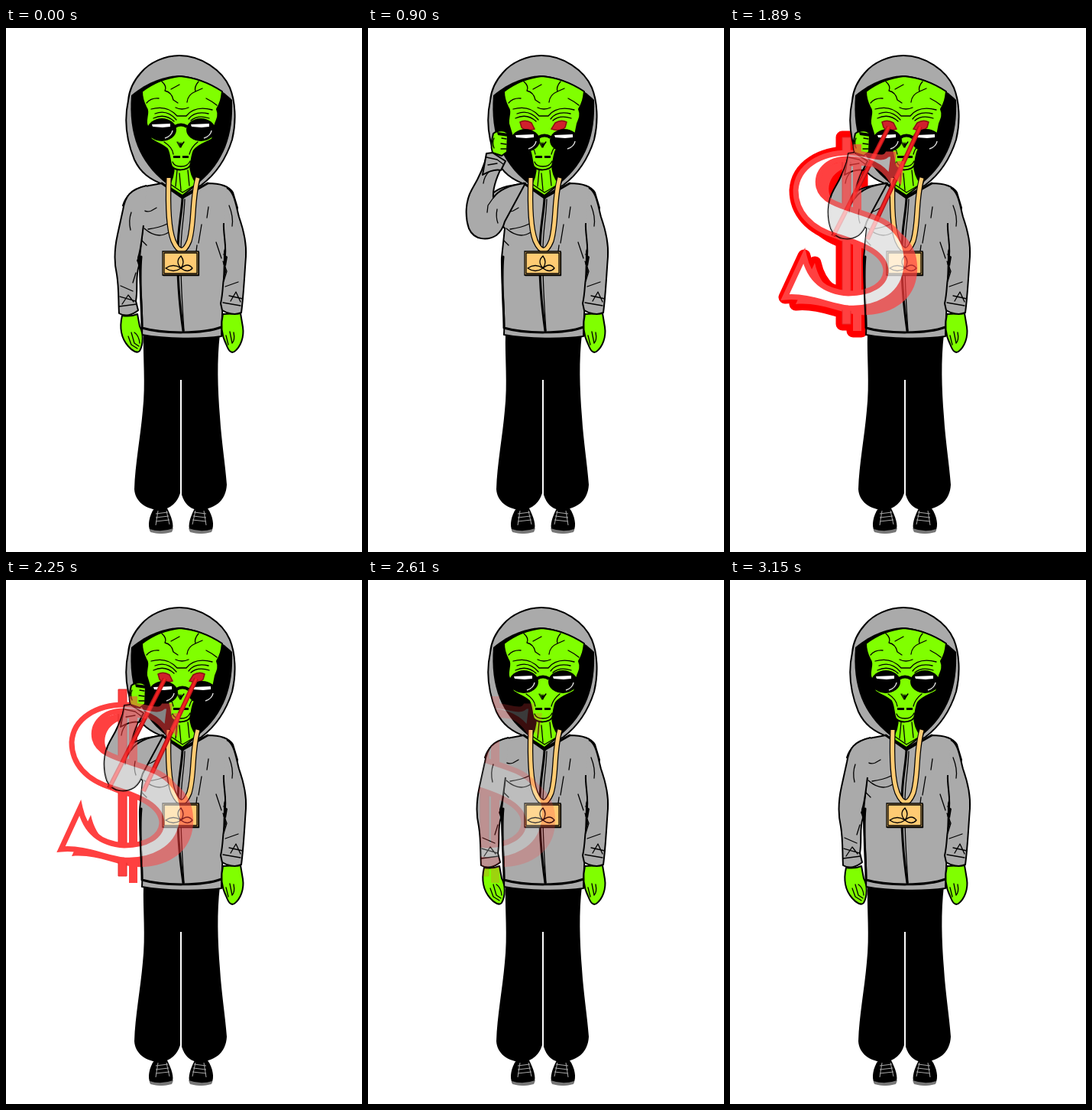
An HTML page that plays this animation: 466 by 685 pixels, repeating every 3.78 s.

```html
<!DOCTYPE html>
<html lang="en">
<head>
<meta charset="utf-8">
<title>Laser eyes</title>
<style>
html, body { margin: 0; width: 100%; height: 100%; overflow: hidden; background: #fff; }
svg { display: block; width: 100vw; height: 100vh; }
.gray { fill: #aaa; stroke: #000; stroke-width: 2; stroke-linejoin: round; }
.skin { fill: #80ff00; stroke: #000; stroke-width: 2; stroke-linejoin: round; }
.gold { fill: #ffcb73; stroke: #000; stroke-width: 1.3; }
.ink { fill: none; stroke: #000; stroke-width: 1.3; stroke-linecap: round; stroke-linejoin: round; }
.bold { stroke-width: 3; }
.red { fill: #ff4040; }
.halo { fill: #f00; stroke: #f00; stroke-width: 17; stroke-linejoin: round; }

/* One tick is 90 ms; 42 ticks make the loop. */
.anim, .glasses, .grip, .up, .down, .beam, .sign, .edge, .tint { animation: 3780ms step-end infinite; }
.glasses { animation-name: slide; }
.grip { animation-name: pull; }
.up { animation-name: up; }
.down { animation-name: down; }
.beam { animation-name: beam; }
.sign { animation-name: sign; }
.edge { animation-name: edge; }
.tint { animation-name: tint; }
@keyframes slide {
  0% { transform: none; }
  11.9% { transform: translate(0, 0); animation-timing-function: steps(5); }
  23.8% { transform: translate(2px, 14px); }
  69.04%, 100% { transform: none; }
}
@keyframes pull {
  0% { transform: none; }
  11.9% { transform: translate(0, 0); animation-timing-function: steps(5); }
  23.8%, 100% { transform: translate(-3px, 14px); }
}
@keyframes up { 0% { opacity: 0; } 11.9% { opacity: 1; } 69.04%, 100% { opacity: 0; } }
@keyframes down { 0% { opacity: 1; } 11.9% { opacity: 0; } 69.04%, 100% { opacity: 1; } }
@keyframes beam {
  0% { stroke-dashoffset: 1; }
  23.8% { stroke-dashoffset: 1; animation-timing-function: steps(4); }
  33.33% { stroke-dashoffset: 0; }
  69.04%, 100% { stroke-dashoffset: 1; }
}
@keyframes sign { 0% { opacity: 0; } 33.33% { opacity: 1; } 64.28%, 100% { opacity: 0; } }
@keyframes edge { 0% { opacity: 0; } 38.09% { opacity: 1; } 54.76%, 100% { opacity: 0; } }
@keyframes tint {
  0% { opacity: 0; }
  26.19% { opacity: 0; animation-timing-function: steps(6); }
  40.47% { opacity: .74; animation-timing-function: steps(4); }
  50% { opacity: .7; animation-timing-function: steps(4); }
  59.52% { opacity: .52; animation-timing-function: steps(4); }
  69.04% { opacity: .23; animation-timing-function: steps(6); }
  83.33%, 100% { opacity: 0; }
}
</style>
</head>
<body>
<svg viewBox="0 0 466 685" preserveAspectRatio="none">
  <defs>
    <path id="hood" d="M227 36C208 36 188 45 177 58C166 70 161 82 160 95C154 122 159 150 168 172C176 189 188 198 207 205L231 220L256 205C276 190 289 168 296 146C302 121 300 95 293 78C283 55 255 36 227 36Z"/>
    <path id="torso" d="M204 203L231 222L264 203C280 203 292 207 297 215L303 235L286 292C286 325 283 365 282 403C255 407 210 407 178 401C180 370 174 330 175 300L179 262L153 232C158 216 170 210 182 207Z"/>
    <path id="armRight" d="M289 209C299 214 301 232 305 247C311 264 315 284 314 299C312 325 311 350 308 372C300 376 289 373 283 369L281 360C285 343 283 329 287 319L286 304C290 288 284 270 285 255"/>
    <path id="armLeft" d="M184 206C162 211 156 220 153 238L146 270C142 288 141 305 145 322C148 340 147 358 148 373C156 378 166 375 173 369L170 357C173 340 169 325 174 311L173 300C177 288 178 272 180 258"/>
    <path id="armUp" d="M206 203C184 205 170 213 164 222C163 210 167 196 179 174L156 164C152 182 145 196 136 211C127 227 127 247 132 262C139 278 157 278 168 271C173 267 177 261 179 253Z"/>
    <path id="cuff" d="M158 150L166 149L183 160L177 172C169 170 160 174 153 178Z"/>
    <path id="fist" d="M167 124C173 119 182 119 186 124L185 148L178 153L166 149C163 140 165 133 167 124Z"/>
    <path id="handLeft" d="M152 376C148 393 152 407 160 416C165 422 172 426 175 422C180 413 180 399 175 390L172 374C165 377 158 377 152 376Z"/>
    <path id="ess" d="M214 165L210 197C200 181 181 171 155 171C126 171 112 189 116 208C122 232 160 235 195 250C225 264 235 290 230 318C224 352 190 368 155 366C130 364 105 349 72 352L97 298C104 330 125 345 155 347C185 347 203 335 204 318C204 295 175 283 140 272C105 262 86 240 86 212C88 180 120 163 155 163C180 163 200 175 206 165Z"/>
    <path id="bar" d="M147 143H158V387H147Z"/>
    <g id="dollar">
      <g class="red" transform="translate(14 9)"><use href="#ess"/><use href="#bar"/></g>
      <use href="#bar" fill="#ff4040" stroke="#e52b2b"/>
      <use href="#ess" fill="#fff" stroke="#ff4040" stroke-width="7"/>
    </g>
    <g id="lens">
      <ellipse rx="19" ry="15"/>
      <path d="M-13 -7L11 -8L11 -4L1 -3L-12 -4Z" fill="#fff"/>
      <path d="M4 11Q13 8 14 1" fill="none" stroke="#ddd" stroke-width="1.5"/>
    </g>
    <g id="shoe">
      <path d="M194 628C187 638 185 651 189 658Q203 663 217 658C221 650 216 638 211 628Z"/>
      <path d="M188 655Q203 660 219 654L217 659Q203 663 189 659Z" fill="#777"/>
      <path d="M196 635L212 633M196 640L213 638M196 645L214 643M199 631L196 650M210 631L214 649" stroke="#aaa" fill="none"/>
    </g>
    <clipPath id="raised">
      <use href="#hood"/><use href="#torso"/><use href="#armUp"/><use href="#cuff" transform="translate(-3 14)"/><use href="#fist" transform="translate(-3 14)"/>
    </clipPath>
    <clipPath id="lowered">
      <use href="#hood"/><use href="#torso"/><use href="#armLeft"/><use href="#handLeft"/>
    </clipPath>
  </defs>

  <g class="sign">
    <g class="edge halo">
      <use href="#ess"/><use href="#bar"/>
      <g transform="translate(14 9)"><use href="#ess"/><use href="#bar"/></g>
    </g>
    <use href="#dollar"/>
  </g>

  <!-- legs -->
  <path d="M180 400H280C276 435 277 470 280 508C282 540 287 570 289 597C288 618 273 630 250 630Q235 627 230 610L230 460L228 460L228 608Q222 627 203 630C183 630 169 619 168 603C169 570 176 535 179 500C183 465 179 430 180 400Z"/>
  <use href="#shoe"/>
  <use href="#shoe" transform="translate(458 0) scale(-1 1)"/>

  <!-- hood and head -->
  <use href="#hood" class="gray"/>
  <path d="M164 88C185 70 210 62 229 62C255 65 280 78 296 94C298 140 285 175 253 202L231 218L208 202C175 175 160 140 164 88Z"/>
  <path class="skin" d="M220 178C220 190 217 201 212 207L231 219L250 204C244 196 241 187 241 178Z"/>
  <path class="skin" d="M178 83C192 72 210 65 228 63C250 65 268 73 283 83C282 92 281 98 276 106C279 113 277 118 274 125L270 145C262 150 252 152 246 160C243 166 243 174 241 180C236 187 222 187 217 181C214 174 215 165 211 158C204 151 195 150 190 145L184 125C183 115 188 110 183 103C179 95 178 90 178 83Z"/>
  <path class="ink" d="M204 70Q211 76 208 82Q217 84 219 94L225 98M216 80L227 74M252 70Q246 77 248 83Q238 87 237 97M248 83L257 79M184 98Q190 91 200 92M262 92Q270 96 276 101M190 106Q211 100 224 115H236Q247 101 270 107M195 112Q211 106 223 120M239 119Q247 108 265 112M222 104Q230 108 239 104M193 118Q208 111 220 122M242 121Q251 113 266 118M224 186L222 207M238 186L240 206M227 190L229 212"/>
  <path class="ink" d="M224 149L228 156L233 149M229 150V155M218 175Q220 181 229 181T241 174M207 149Q218 156 219 165M251 149Q242 156 240 165"/>
  <path d="M225 148L229 157L233 148L229 152ZM219 167H228V170H219ZM231 167H239V170H231Z"/>
  <g fill="#d0202c" stroke="#811" stroke-width="1.5">
    <path d="M199 123Q206 119 214 124L218 132Q207 136 201 130Z"/>
    <path d="M260 123Q253 119 245 124L240 132Q252 136 258 130Z"/>
  </g>
  <g class="glasses">
    <path d="M184 129L180 124M221 129Q229 124 237 129M273 129L278 124" fill="none" stroke="#000" stroke-width="4"/>
    <use href="#lens" x="204" y="133"/>
    <use href="#lens" x="255" y="133"/>
  </g>

  <!-- jacket -->
  <use href="#torso" class="gray"/>
  <path class="ink bold" d="M204 203L231 222L264 203M177 299C174 330 178 365 178 392C205 400 258 400 282 391"/>
  <path class="ink" d="M212 202L231 215L253 202M176 235Q182 242 190 239L197 235M181 262Q198 277 213 267M186 263Q201 261 211 256M178 278L184 284M265 234L263 248M256 257L252 281M250 284L249 292M275 280L282 301"/>
  <path class="ink bold" d="M231 222C230 245 225 260 225 290C224 325 227 361 232 396"/>
  <path class="ink" d="M234 224C233 250 229 265 229 290C228 325 231 365 233 396"/>
  <path class="skin" d="M284 374C280 391 283 403 288 413C291 421 294 426 299 423C307 417 312 404 310 391L307 373Z"/>
  <path class="ink" d="M288 402L291 414M293 397L296 412Q300 408 298 398"/>
  <use href="#armRight" class="gray"/>
  <path class="ink" d="M292 232Q298 247 296 259M284 305L289 318L285 331M287 338L304 332M292 350L310 354M284 359L307 363M294 357L301 345L307 358"/>
  <path d="M284 295Q288 303 284 309L288 311L290 299Z"/>

  <!-- pendant -->
  <path d="M213 197C212 224 212 260 219 278Q230 303 240 278C247 254 243 224 251 197" fill="none" stroke="#000" stroke-width="7.5"/>
  <path d="M213 196C212 224 212 260 219 278Q230 303 240 278C247 254 243 224 251 196" fill="none" stroke="#ffcb73" stroke-width="5"/>
  <path class="gold" d="M205 292H252V323H205Z"/>
  <path class="ink" d="M207 294H250V321H207ZM229 314Q221 305 229 298Q235 306 229 314Q219 307 209 314Q219 321 229 314Q238 306 244 314Q238 321 229 314"/>
  <path class="ink" d="M206 323.500H252.500V293" stroke-width="2"/>

  <g class="down">
    <use href="#handLeft" class="skin"/>
    <path class="ink" d="M160 403L164 414L172 419M164 398L168 412L174 416M168 398Q174 402 175 412"/>
    <use href="#armLeft" class="gray"/>
    <path class="ink" d="M164 241Q160 252 163 264M170 320L166 333M150 337L166 344M149 351L170 357M148 364L171 361M152 361L160 349L167 358"/>
    <path d="M174 297L178 305L174 311L171 304Z"/>
  </g>
  <g class="up">
    <use href="#armUp" class="gray"/>
    <path class="ink" d="M164 222L157 232L156 241M159 187Q152 194 151 203M169 237Q167 247 170 255M172 179L163 183"/>
    <g class="grip">
      <use href="#fist" class="skin"/>
      <path class="ink" d="M178 130L184 131M177 137L184 138M177 144L184 144M168 130Q165 136 168 143"/>
      <path d="M172 122L187 124V128L173 126Z"/>
      <use href="#cuff" class="gray"/>
      <path class="ink" d="M158 155L172 158L180 164M160 165L172 163"/>
    </g>
  </g>

  <g fill="none" stroke-dasharray="1 2">
    <g stroke="#b51418" stroke-width="6">
      <path class="beam" pathLength="1" d="M208 129L135 272"/>
      <path class="beam" pathLength="1" d="M249 129L180 276"/>
    </g>
    <g stroke="#f02222" stroke-width="3">
      <path class="beam" pathLength="1" d="M208 129L135 272"/>
      <path class="beam" pathLength="1" d="M249 129L180 276"/>
    </g>
  </g>

  <g class="up"><g clip-path="url(#raised)"><use href="#dollar" class="tint"/></g></g>
  <g class="down"><g clip-path="url(#lowered)"><use href="#dollar" class="tint"/></g></g>
</svg>
</body>
</html>
```
